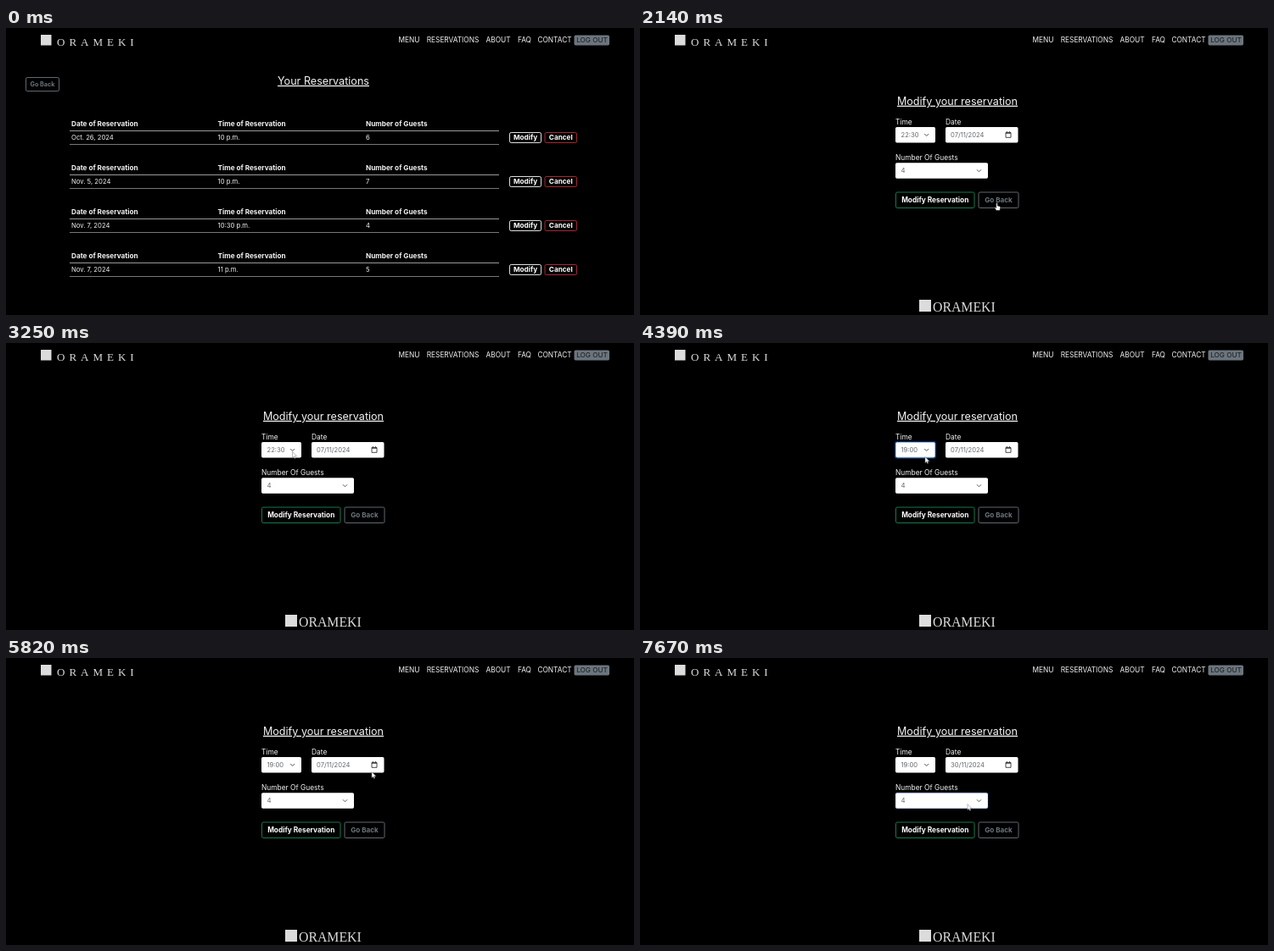
An HTML page for the animation above (8 s loop, 740 by 339 pixels).

```html
<!DOCTYPE html>
<html lang="en">
<head>
<meta charset="utf-8">
<title>Reservations</title>
<style>
  html, body { margin: 0; width: 100%; height: 100%; overflow: hidden; background: #000; }
  svg { display: block; width: 740px; height: 339px; }
  text { font-family: Inter, "Open Sans", sans-serif; fill: #f4f4f4; white-space: pre; }
  .serif { font-family: "Liberation Serif", serif; fill: #dcdcdc; }
  .title { font-size: 12.6px; text-decoration: underline; text-underline-offset: 1.6px; text-decoration-thickness: 1px; }
  .mid { text-anchor: middle; }
</style>
</head>
<body>
<svg viewBox="0 0 740 339">
  <g id="head"></g>
  <g id="list"></g>
  <g id="form"></g>
  <path id="arrow" d="M0 0V7L1.6 5.6L2.6 7.8L3.7 7.4L2.8 5.2H5Z" fill="#fff" stroke="#777" stroke-width=".5"/>
  <path id="hand" d="M-.8.6Q0-.4.8.6V3.4L3.6 4.2Q4.4 4.5 4.2 5.5L3.5 9H-.6L-2.8 5.8Q-2.6 4.8-.8 6Z" fill="#fff" stroke="#222" stroke-width=".6"/>
</svg>
<script>
const LOOP = 8000, GREY = '#6c757d', INK = '#62676c';
const $ = id => document.getElementById(id);

function add(parent, tag, attrs, content = '') {
  const el = document.createElementNS('http://www.w3.org/2000/svg', tag);
  for (const key in attrs) el.setAttribute(key, attrs[key]);
  el.textContent = content;
  return parent.appendChild(el);
}
function label(parent, x, y, size, str, weight = 400, fill = '#f4f4f4') {
  return add(parent, 'text', { x, y, style: `font-size:${size}px;font-weight:${weight};fill:${fill}` }, str);
}
function box(parent, x, y, width, height, fill, stroke = 'none') {
  return add(parent, 'rect', { x, y, width, height, rx: 1.7, fill, stroke, 'stroke-width': .9 });
}
function button(parent, x, y, width, height, str, size, stroke, color = '#fff') {
  box(parent, x, y, width, height, 'none', stroke);
  label(parent, x + width / 2, y + height / 2 + size * .36, size, str, 700, color).classList.add('mid');
}
function title(parent, x, y, str) {
  add(parent, 'text', { x, y, class: 'title mid' }, str);
}
function brand(parent, x, y, side, textX, size, spacing) {
  add(parent, 'rect', { x, y: y - side, width: side, height: side, fill: '#dcdcdc' });
  add(parent, 'text', { x: textX, y, class: 'serif', 'font-size': size, 'letter-spacing': spacing }, 'ORAMEKI');
}

// Header
const head = $('head');
brand(head, 41, 20.5, 12.5, 60, 13, 5);
[['MENU', 475], ['RESERVATIONS', 526.5], ['ABOUT', 580], ['FAQ', 611], ['CONTACT', 646.5]]
  .forEach(([str, x]) => label(head, x, 17.4, 8.3, str).classList.add('mid'));
box(head, 669.5, 8.5, 41.5, 12, GREY);
label(head, 690.5, 17.4, 8.2, 'LOG OUT', 500, '#22272b').classList.add('mid');

// Reservation list
const list = $('list');
title(list, 374, 66.8, 'Your Reservations');
button(list, 23.5, 58.5, 39, 16, 'Go Back', 7.2, GREY, GREY);
[['Oct. 26, 2024', '10 p.m.', 6], ['Nov. 5, 2024', '10 p.m.', 7],
 ['Nov. 7, 2024', '10:30 p.m.', 4], ['Nov. 7, 2024', '11 p.m.', 5]].forEach((row, i) => {
  const y = 52 * i, columns = [77, 249.5, 424];
  ['Date of Reservation', 'Time of Reservation', 'Number of Guests']
    .forEach((str, c) => label(list, columns[c], y + 116, 8.2, str, 700));
  row.forEach((str, c) => label(list, columns[c], y + 132, 7.7, str));
  add(list, 'path', { d: `M75 ${y + 121.5}H581`, stroke: '#999' });
  add(list, 'path', { d: `M75 ${y + 137.5}H581`, stroke: '#777' });
  button(list, 593.5, y + 123.5, 37, 12, 'Modify', 8.2, '#f8f9fa');
  button(list, 635, y + 123.5, 37.5, 12, 'Cancel', 8.2, '#b92d3b');
});

// Modification form
const form = $('form');
const chevron = (x, y) => add(form, 'path', { d: `M${x - 2.5} ${y - 1.2}l2.5 2.5l2.5-2.5`, fill: 'none', stroke: '#50565b', 'stroke-width': 1 });
function ring(x, y, width, height) {
  const g = add(form, 'g', {});
  add(g, 'rect', { x: x - .5, y: y - .5, width: width + 1, height: height + 1, rx: 2.2, fill: 'none', stroke: '#0b2a5c', 'stroke-width': 1.6 });
  box(g, x + .5, y + .5, width - 1, height - 1, 'none', '#a9c8f5');
  return g;
}
title(form, 374, 90.7, 'Modify your reservation');
label(form, 301, 114, 8.4, 'Time');
label(form, 360, 114, 8.4, 'Date');
label(form, 301, 156.4, 8.4, 'Number Of Guests');
box(form, 301, 117, 47, 18.5, '#fff');
box(form, 360, 117, 85.5, 18.5, '#fff');
box(form, 301, 159.3, 109, 18.5, '#fff');
const timeRing = ring(301, 117, 47, 18.5), guestRing = ring(301, 159.3, 109, 18.5);
const time = label(form, 307.5, 129, 7.6, '', 400, INK);
const date = label(form, 366, 129, 7.6, '', 400, INK);
label(form, 307.5, 171.3, 7.8, '4', 400, INK);
chevron(337.7, 126.2);
chevron(399.5, 168.5);
add(form, 'path', { d: 'M431 123.5h6v5.8h-6zM431 124.3h6M432.4 122v1M435.6 122v1', fill: 'none', stroke: '#333', 'stroke-width': .9 });
button(form, 301.5, 194, 92.5, 18.5, 'Modify Reservation', 8.3, '#198754');
button(form, 399, 194, 47, 18.5, 'Go Back', 8.1, GREY, GREY);
brand(form, 329, 335, 14, 345, 15.8, 0);

// Pointer path: time, x, y
const path = [
  [2160, 420.5, 206.5], [2870, 342, 133], [2950, 342, 133], [3250, 337.5, 128.5], [4389, 337.5, 128.5],
  [4390, 336, 134.5], [4470, 336, 134.5], [5170, 424, 136], [5320, 424, 136], [5680, 431, 134.5],
  [6830, 431, 134.5], [7360, 388, 170], [7530, 388, 170], [7670, 386, 172.5]
];
const clamp = v => Math.max(0, Math.min(1, v));
const fade = (t, start) => clamp((t - start) / 150);

function pointer(t) {
  let i = path.findIndex(p => p[0] > t);
  if (i < 0) i = path.length;
  const a = path[Math.max(0, i - 1)], b = path[Math.min(i, path.length - 1)];
  const k = a === b ? 0 : clamp((t - a[0]) / (b[0] - a[0])), e = k * k * (3 - 2 * k);
  return [a[1] + (b[1] - a[1]) * e, a[2] + (b[2] - a[2]) * e];
}
const show = (el, on) => el.style.display = on ? '' : 'none';

function draw(now) {
  const t = now % LOOP, editing = t >= 2140;
  show(list, !editing);
  show(form, editing);
  time.textContent = t < 4390 ? '22:30' : '19:00';
  date.textContent = t < 6830 ? '07/11/2024' : '30/11/2024';
  timeRing.style.opacity = fade(t, 3500) * (1 - fade(t, 5600));
  guestRing.style.opacity = .6 * fade(t, 7570);
  const [x, y] = pointer(t), overButton = y > 194 && x > 398;
  show($('hand'), editing && overButton);
  show($('arrow'), editing && !overButton);
  for (const id of ['hand', 'arrow']) $(id).setAttribute('transform', `translate(${x} ${y})`);
}
let start;
function tick(now) {
  start ??= now;
  draw(now - start);
  requestAnimationFrame(tick);
}
draw(0);
requestAnimationFrame(tick);
</script>
</body>
</html>
```
